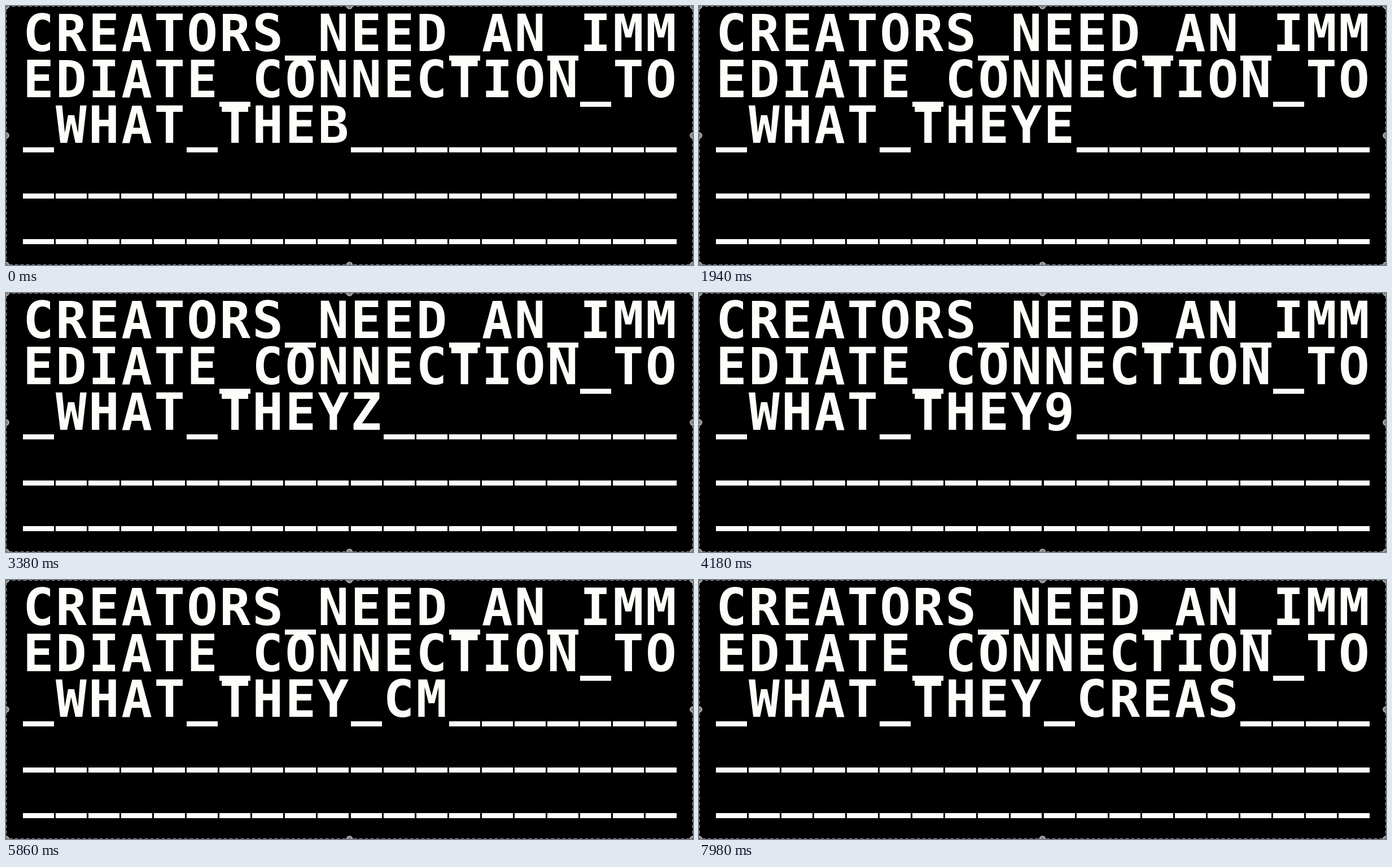
These frames come from a looping animation (1217 px wide and 460 px high, 8000 ms). An HTML page with a canvas:

```html
<!DOCTYPE html>
<html lang="en">
<head>
<meta charset="utf-8">
<style>
html, body { margin: 0; width: 100%; height: 100%; overflow: hidden; background: #000; }
canvas { display: block; }
</style>
</head>
<body>
<canvas id="stage" width="1217" height="460"></canvas>
<script>
const ctx = document.getElementById('stage').getContext('2d');
const W = 1217, H = 460, LOOP = 8000;
const COLS = 20, ROWS = 5, LEFT = 30, PITCH = 58.05, BASE = 80, LINE = 81.6;
const WHITE = '#fdfdfa';
const TYPED = 'CREATORS_NEED_AN_IMMEDIATE_CONNECTION_TO_WHAT_THE';
const NEXT = 'Y_CREAT';
const DRUM = 'ABCDEFGHIJKLMNOPQRSTUVWXYZ.0123456789,:;!?-+_';

// Two letter steps per 140 ms: a short one, then a longer one.
function stepAt(t) {
  const shifted = t + 20;
  return 2 * Math.floor(shifted / 140) + (shifted % 140 >= 40 ? 1 : 0);
}

// Each cell runs through the drum from A until it reaches its letter.
function textAt(t) {
  let left = stepAt(t) + 1, text = TYPED;
  for (const letter of NEXT) {
    const turns = DRUM.indexOf(letter) + 1;
    if (left < turns) { text += DRUM[left]; break; }
    text += letter;
    left -= turns;
  }
  return text.padEnd(COLS * ROWS, '_');
}

function drawCell(letter, i) {
  const x = LEFT + (i % COLS) * PITCH;
  const y = Math.round(BASE + Math.floor(i / COLS) * LINE);
  if (letter === '_') ctx.fillRect(Math.round(x), y + 8, 55, 9);
  else ctx.fillText(letter, x, y);
}

function drawFrame() {
  ctx.strokeStyle = '#a8a8a8';
  ctx.lineWidth = 1;
  ctx.setLineDash([6, 4]);
  ctx.strokeRect(0.5, 0.5, W - 1, H - 1);
  ctx.setLineDash([]);
  ctx.fillStyle = '#858585';
  ctx.strokeStyle = '#c4c4c4';
  ctx.lineWidth = 1.5;
  for (const x of [0, W / 2, W]) for (const y of [0, H / 2, H]) {
    if (x === W / 2 && y === H / 2) continue;
    ctx.beginPath();
    ctx.arc(x, y, 5, 0, 2 * Math.PI);
    ctx.fill();
    ctx.stroke();
  }
}

function render(t) {
  ctx.fillStyle = '#000';
  ctx.fillRect(0, 0, W, H);
  ctx.fillStyle = WHITE;
  ctx.font = 'bold 91px "DejaVu Sans Mono", monospace';
  [...textAt(t)].forEach(drawCell);
  drawFrame();
}

const start = performance.now();
function tick() {
  render((performance.now() - start) % LOOP);
  requestAnimationFrame(tick);
}
tick();
</script>
</body>
</html>
```
